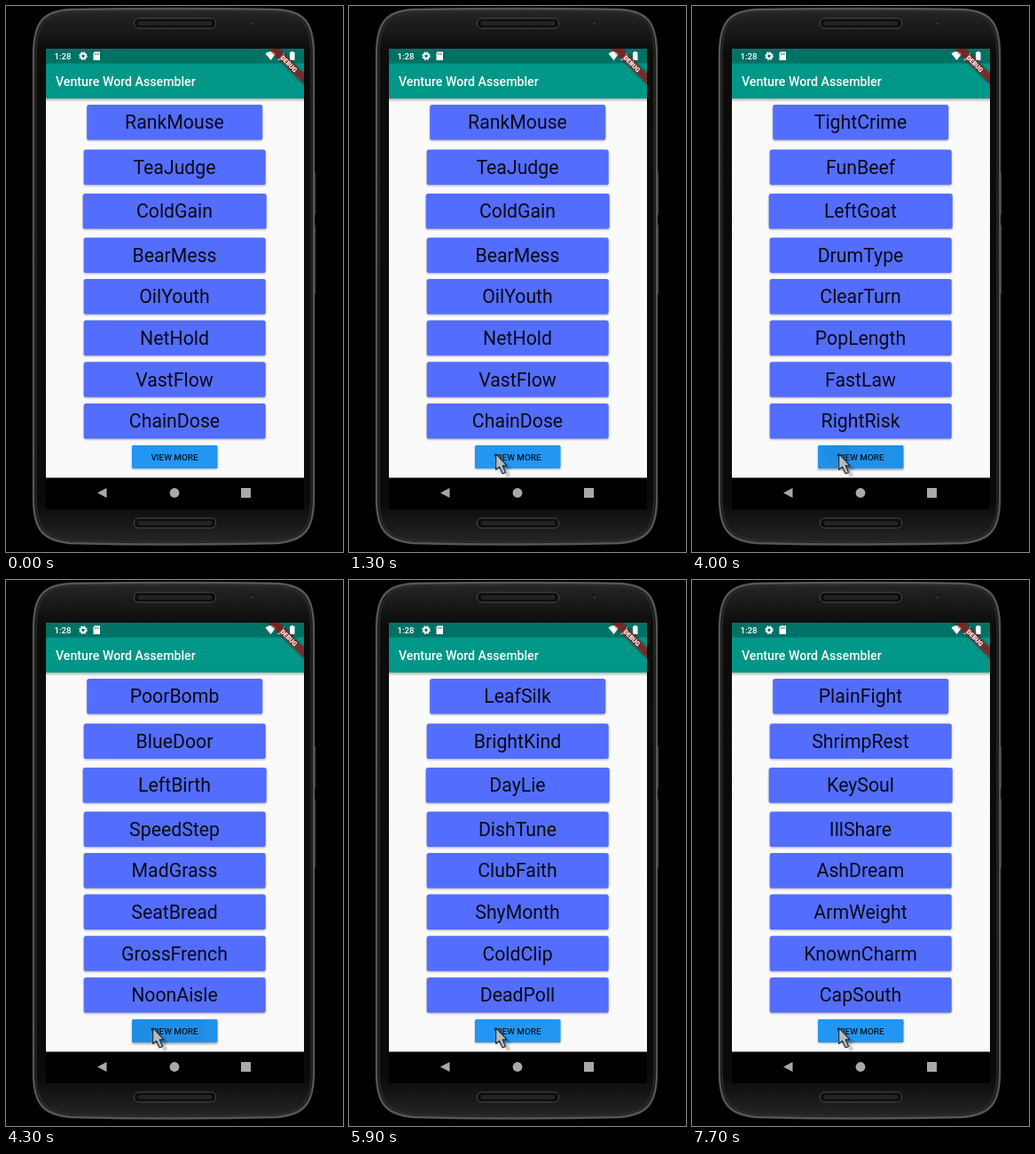
An HTML page for the animation above (8000 ms loop, 380 by 614 pixels).

```html
<!DOCTYPE html>
<html lang="en">
<head>
<meta charset="utf-8">
<title>Phone app</title>
<style>
  html, body { margin: 0; width: 100%; height: 100%; overflow: hidden; background: #000; }
  svg { display: block; width: 100%; height: 100%; font-family: Roboto, sans-serif; }
  .names { font-size: 21.25px; text-anchor: middle; fill: #080a14; }
  .medium { font-weight: 500; }
</style>
</head>
<body>
<svg viewBox="0 0 380 614">
  <defs>
    <linearGradient id="body" x2="0" y2="1">
      <stop offset="0" stop-color="#262624"/>
      <stop offset=".08" stop-color="#0c0c0b"/>
      <stop offset=".92" stop-color="#0a0a09"/>
      <stop offset="1" stop-color="#262624"/>
    </linearGradient>
    <linearGradient id="barShadow" x2="0" y2="1">
      <stop stop-color="#000" stop-opacity=".3"/>
      <stop offset="1" stop-color="#000" stop-opacity="0"/>
    </linearGradient>
    <filter id="soft" x="-30%" y="-60%" width="160%" height="220%"><feGaussianBlur stdDeviation=".9"/></filter>
    <filter id="blur" x="-30%" y="-60%" width="160%" height="220%"><feGaussianBlur stdDeviation="1.800"/></filter>
    <clipPath id="screen"><rect x="45" y="48" width="291" height="482.600"/></clipPath>
    <clipPath id="moreShape"><rect x="142" y="494" width="96.500" height="26" rx="1.5"/></clipPath>
    <g id="grille">
      <rect width="92" height="11" rx="5" fill="#0c0c0c" stroke="#4c4c4a"/>
      <rect x="4" y="3" width="84" height="5" rx="2.5" fill="#232322"/>
    </g>
  </defs>

  <rect width="380" height="614"/>
  <g fill="#3c3c3a" stroke="#5a5a58" stroke-width=".6">
    <rect x="345" y="187" width="3.500" height="48" rx="1.2"/>
    <rect x="345" y="246" width="3.500" height="78" rx="1.2"/>
  </g>
  <path fill="url(#body)" stroke="#565654" stroke-width="2.4"
    d="M31 55C31 19 41 6 72 4Q190 2 306 4C337 6 347 19 347 55V554C347 588 337 601 306 604Q190 607 72 604C41 601 31 588 31 554Z"/>
  <path fill="none" stroke="#2c2c2a" stroke-width="1.4"
    d="M34 55C34 22 43 9 73 7Q190 5 305 7C335 9 344 22 344 55V554C344 585 335 598 305 601Q190 604 73 601C43 598 34 585 34 554Z"/>
  <use href="#grille" x="144.500" y="14"/>
  <use href="#grille" x="144.500" y="576"/>
  <circle cx="277" cy="19.500" r="3.800" fill="#171a20"/>
  <circle cx="277" cy="19.500" r="1.800" fill="#2b2f48"/>
  <rect x="45" y="48" width="291" height="518"/>

  <g clip-path="url(#screen)">
    <rect x="45" y="48" width="291" height="483" fill="#fafafa"/>
    <rect x="45" y="104" width="291" height="4" fill="url(#barShadow)"/>
    <rect x="45" y="48" width="291" height="56" fill="#009688"/>
    <rect x="45" y="48" width="291" height="16.500" fill="#007165"/>
    <g fill="#fff" class="medium">
      <text x="54.500" y="60" font-size="9.600">1:28</text>
      <text x="56" y="90" font-size="14.170">Venture Word Assembler</text>
      <path d="M99.500 51.500H106V61H98.500V53.500Z"/>
      <path d="M292.500 53.500Q298.500 48.500 304.500 53.500L298.500 61Z"/>
      <path d="M306 61L314 52V61Z"/>
      <path d="M320 52H321.500V51H324V52H325.500V61H320Z"/>
    </g>
    <g fill="none" stroke="#fff">
      <circle cx="87" cy="56.200" r="2.700" stroke-width="2"/>
      <circle cx="87" cy="56.200" r="4.100" stroke-width="1.300" stroke-dasharray="1.800 1.420"/>
    </g>
    <path d="M100.500 53V55M102.300 53V55M104.100 53V55" stroke="#007165" stroke-width=".8"/>
    <g transform="translate(336 48) rotate(45)">
      <rect x="-28.300" y="19.800" width="56.600" height="8.500" opacity=".5" filter="url(#blur)"/>
      <rect x="-28.300" y="19.800" width="56.600" height="8.500" fill="#b71c1c" fill-opacity=".63"/>
      <text y="26.600" font-size="7.200" font-weight="900" fill="#fff" text-anchor="middle">DEBUG</text>
    </g>
    <g id="cards"></g>
    <g class="names" id="names"></g>
    <rect id="moreShadow" x="142" y="495" width="96.500" height="26" rx="1.500" opacity=".32" filter="url(#soft)"/>
    <g clip-path="url(#moreShape)">
      <rect x="142" y="494" width="97" height="26" fill="#2196f3"/>
      <rect id="highlight" x="142" y="494" width="97" height="26"/>
      <circle id="splash" cx="165" cy="504"/>
    </g>
    <text x="190" y="510.500" font-size="9.900" class="medium" fill-opacity=".87" text-anchor="middle">VIEW MORE</text>
  </g>

  <g fill="#a9a9a9">
    <path d="M103 547.500L113.500 542V553Z"/>
    <circle cx="190" cy="547.500" r="5.400"/>
    <rect x="265" y="542" width="11" height="11" rx=".8"/>
  </g>

  <g id="cursor">
    <path d="M5 5V23L9.500 19.500L13 27L17 25L13.500 18.500L19 18Z" opacity=".22" filter="url(#soft)"/>
    <path d="M.7.7V18.500L4.600 15.300L8.200 23L11.600 21.400L8.200 13.900H13Z" fill="#b3bcc1" stroke="#24282b" stroke-width="1.100" stroke-linejoin="round"/>
  </g>
</svg>

<script>
const LOOP = 8000, STEP = 100;
const nameSets = [
  "RankMouse TeaJudge ColdGain BearMess OilYouth NetHold VastFlow ChainDose",
  "TightCrime FunBeef LeftGoat DrumType ClearTurn PopLength FastLaw RightRisk",
  "PoorBomb BlueDoor LeftBirth SpeedStep MadGrass SeatBread GrossFrench NoonAisle",
  "LeafSilk BrightKind DayLie DishTune ClubFaith ShyMonth ColdClip DeadPoll",
  "PlainFight ShrimpRest KeySoul IllShare AshDream ArmWeight KnownCharm CapSouth"
].map(set => set.split(" "));
const swapTimes = [2500, 4200, 5700, 7600];
const presses = [[2700, 2900], [4000, 4400], [5500, 5900], [7400, 7700]];
const cardTops = [111, 161.5, 211, 260.5, 307, 353.5, 400.3, 447];
const cardWidths = [198, 205, 207, 205, 205, 205, 205, 205];

const $ = id => document.getElementById(id);
const set = (id, attrs) => {
  for (const key in attrs) $(id).setAttribute(key, attrs[key]);
};

$("cards").innerHTML = cardTops.map((y, i) => {
  const box = `x="${190.2 - cardWidths[i] / 2}" width="${cardWidths[i]}" height="39.5" rx="2.6"`;
  return `<rect ${box} y="${y + 1}" opacity=".32" filter="url(#soft)"/>
          <rect ${box} y="${y}" fill="#536dfe"/>`;
}).join("");
$("names").innerHTML = cardTops.map(y => `<text x="190" y="${y + 27.3}"></text>`).join("");
const labels = [...$("names").children];

function drawCursor(t) {
  const u = Math.min(1, (t - 400) / 800);
  const eased = 1 - (1 - u) ** 2;
  const [x, y] = t >= 1300 ? [165, 503] : [28 + 133 * eased, 420 + 82 * eased];
  set("cursor", { transform: `translate(${x} ${y})`, visibility: t < 400 ? "hidden" : "visible" });
}

function drawPress(t) {
  const press = presses.find(([start, end]) => t >= start && t < end);
  const progress = press ? (t - press[0] + STEP) / (press[1] - press[0] + STEP) : 0;
  const strength = Math.sin(Math.PI * progress);
  set("highlight", { opacity: 0.06 * strength });
  set("splash", { r: 75 * progress, opacity: 0.05 * strength });
  set("moreShadow", { y: 495 + 1.5 * strength });
}

function draw(now) {
  const t = Math.floor(now % LOOP / STEP) * STEP;
  const names = nameSets[swapTimes.filter(time => t >= time).length];
  labels.forEach((label, i) => {
    if (label.textContent !== names[i]) label.textContent = names[i];
  });
  drawCursor(t);
  drawPress(t);
}

const begin = performance.now();
function tick() {
  draw(performance.now() - begin);
  requestAnimationFrame(tick);
}
tick();
</script>
</body>
</html>
```
